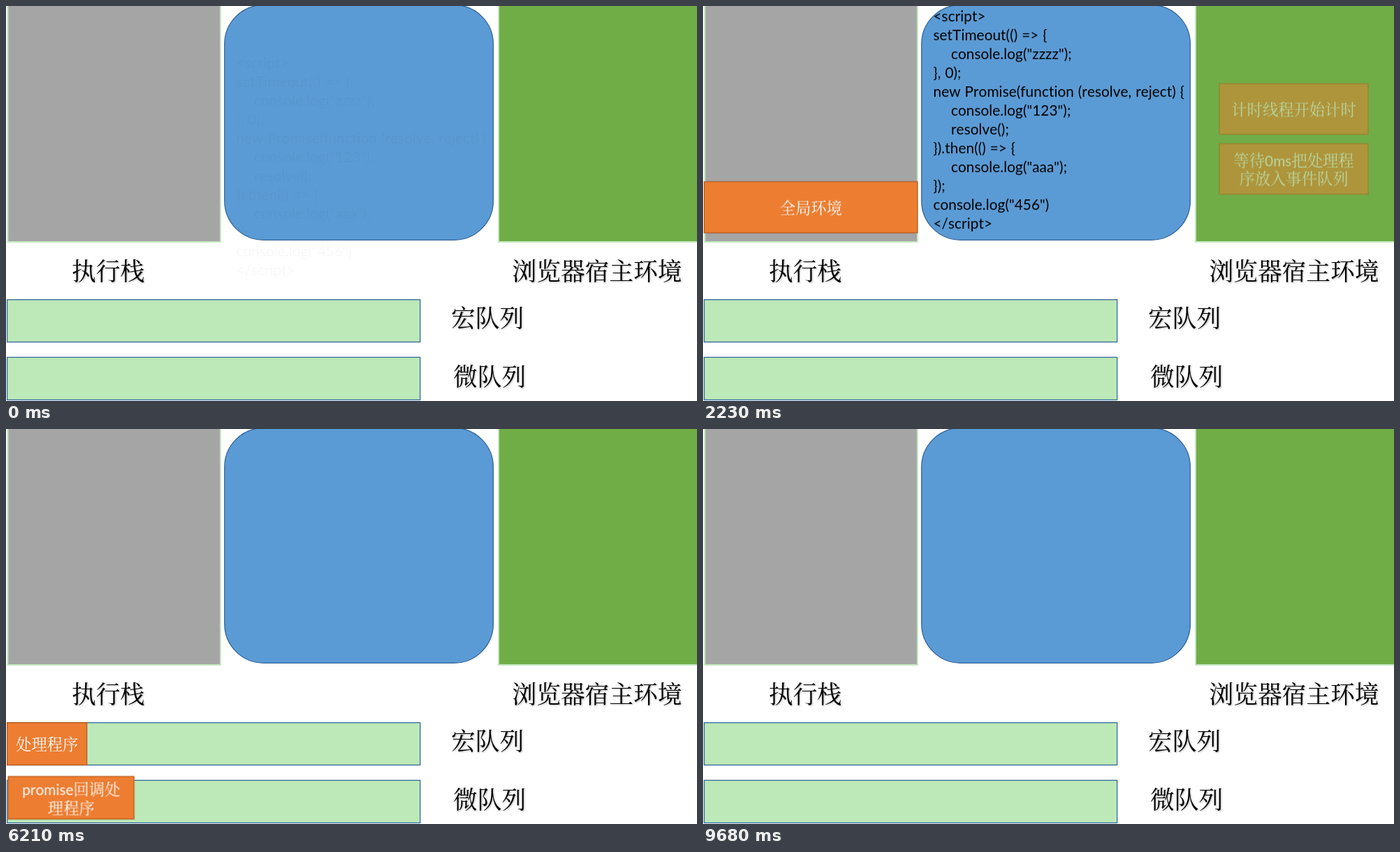
These frames come from a looping animation (989x566 px, 9.71 s). An HTML page:

```html
<!DOCTYPE html>
<html lang="zh-CN">
<head>
<meta charset="utf-8">
<title>事件循环</title>
<style>
html, body { margin: 0; width: 100%; height: 100%; overflow: hidden; background: #fff; }
svg { display: block; width: 989px; height: 566px; }

.panel { stroke: #c3e8bf; stroke-width: 2; }
.editor { fill: #5b9bd5; stroke: #32649b; stroke-width: 1.3; }
.queue { fill: #bde9b8; stroke: #32689b; stroke-width: 1.3; }
.block rect { fill: #ed7d31; stroke: #b85a1c; stroke-width: 1.3; }

text { font-family: SimSun, "Noto Serif CJK SC", "Noto Sans CJK SC", "Noto Sans CJK", serif; font-weight: 200; }
.label { font-size: 34.7px; filter: drop-shadow(1.5px 1.5px 1px rgba(0, 0, 0, .3)); }
.block text { font-size: 22.3px; fill: #fff; text-anchor: middle; }
.code text, .latin {
  font-family: Lato, sans-serif; font-weight: 400; font-size: 20.9px;
  font-kerning: none; font-variant-ligatures: none;
}
.code text { word-spacing: .5px; }

.code, .block { animation: 9710ms linear infinite; }
.code { animation-name: code; }
.global { animation-name: global; }
.timer { animation-name: timer; }
.task { animation-name: task; }
.micro { animation-name: micro; }

@keyframes code {
  0% { transform: translateY(67px); opacity: .03; }
  9.32%, 37.49% { transform: none; opacity: 1; }
  46.86%, 100% { transform: translateY(67px); opacity: 0; }
}
@keyframes global {
  0%, 10.3% { transform: translateY(-340px); }
  23.5%, 46.91% { transform: translateY(0); }
  59.84%, 100% { transform: translateY(-340px); }
}
@keyframes timer {
  0%, 10.35% { transform: translateY(-33.5px); opacity: 0; }
  10.36% { transform: translateY(-33.5px); opacity: 1; }
  35.53%, 100% { transform: translateY(33.5px); opacity: 0; }
}
/* Two quadratic halves: speed up to the midpoint, then slow down. */
@keyframes micro {
  0%, 37.49% { transform: translate(0, 0); opacity: 0; }
  46.86% { transform: translate(0, 0); opacity: 1; }
  62.1% { transform: translate(0, 0); opacity: 1; animation-timing-function: cubic-bezier(.3333, 0, .6667, .3333); }
  70.7% { transform: translate(31.5px, -117.5px); opacity: 1; animation-timing-function: cubic-bezier(.3333, .6667, .6667, 1); }
  79.3%, 80.22% { transform: translate(63px, -235px); opacity: 1; }
  80.23%, 100% { transform: translate(63px, -235px); opacity: 0; }
}
@keyframes task {
  0%, 37.49% { transform: translate(0, 0); opacity: 0; }
  46.86% { transform: translate(0, 0); opacity: 1; }
  81.15% { transform: translate(0, 0); opacity: 1; animation-timing-function: cubic-bezier(.3333, 0, .6667, .3333); }
  89.75% { transform: translate(42px, -76px); opacity: 1; animation-timing-function: cubic-bezier(.3333, .6667, .6667, 1); }
  98.35%, 99.68% { transform: translate(84px, -152px); opacity: 1; }
  99.69%, 100% { transform: translate(84px, -152px); opacity: 0; }
}
</style>
</head>
<body>
<svg viewBox="0 0 989 566">
  <rect class="panel" x="2.5" y="-5" width="304.5" height="343" fill="#a5a5a5"/>
  <rect class="panel" x="705" y="-5" width="300" height="343" fill="#70ad47"/>
  <rect class="editor" x="312.8" y="-1.5" width="384.6" height="336.8" rx="56"/>
  <rect class="queue" x="1.7" y="420.8" width="591" height="60.7"/>
  <rect class="queue" x="1.7" y="503.4" width="591" height="61"/>

  <text class="label" x="94" y="393">执行栈</text>
  <text class="label" x="724.5" y="393">浏览器宿主环境</text>
  <text class="label" x="637" y="460">宏队列</text>
  <text class="label" x="640" y="543.5">微队列</text>

  <g class="code">
    <text x="329.5" y="22">&lt;script&gt;</text>
    <text x="329.5" y="49">setTimeout(() =&gt; {</text>
    <text x="355" y="76">console.log("zzzz");</text>
    <text x="329.5" y="103">}, 0);</text>
    <text x="329.5" y="130">new Promise(function (resolve, reject) {</text>
    <text x="355" y="157">console.log("123");</text>
    <text x="355" y="184">resolve();</text>
    <text x="329.5" y="211">}).then(() =&gt; {</text>
    <text x="355" y="238">console.log("aaa");</text>
    <text x="329.5" y="265">});</text>
    <text x="329.5" y="292">console.log("456")</text>
    <text x="329.5" y="319">&lt;/script&gt;</text>
  </g>

  <g class="block timer">
    <rect x="739" y="111.2" width="213" height="72.6"/>
    <text x="845.5" y="156">计时线程开始计时</text>
    <rect x="739" y="197" width="213" height="72.6"/>
    <text x="845.5" y="229">等待<tspan class="latin">0ms</tspan>把处理程</text>
    <text x="845.5" y="255.5">序放入事件队列</text>
  </g>

  <g class="block global">
    <rect x="1.7" y="265.3" width="305.2" height="73.2"/>
    <text x="154.5" y="310.5">全局环境</text>
  </g>

  <g class="block task">
    <rect x="1.7" y="420.8" width="114" height="60.7"/>
    <text x="58.8" y="460">处理程序</text>
  </g>

  <g class="block micro">
    <rect x="1.7" y="503.4" width="180" height="61"/>
    <text x="91.8" y="529.5"><tspan class="latin">promise</tspan>回调处</text>
    <text x="91.8" y="556.5">理程序</text>
  </g>
</svg>
</body>
</html>
```
